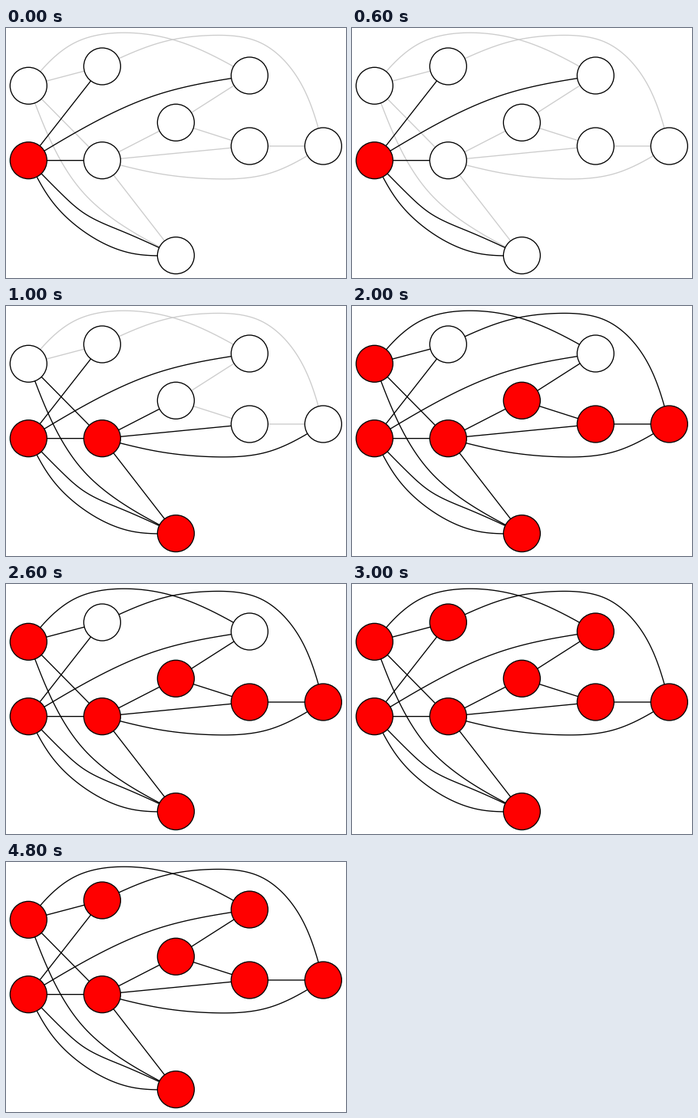
Recreate the animation shown at these times as a matplotlib script. Size 443 by 326 pixels, loop 6000 ms.

```python
import matplotlib.pyplot as plt
import numpy as np
from matplotlib.animation import FuncAnimation
from matplotlib.patches import Circle

WIDTH, HEIGHT, DPI = 443, 326, 64
RADIUS = 24
MARGIN, COLUMN = 29.33, 96
STROKE = 4 / 3 * 72 / DPI
FADED = "#cccccc"

# name: (column, y, step at which the node is reached)
NODES = {
    "a": (0, 75.3, 2), "b": (1, 50, 3), "c": (0, 172.67, 0),
    "d": (1, 172.67, 1), "e": (2, 123.3, 2), "f": (3, 62, 3),
    "g": (3, 154, 2), "h": (4, 154, 2), "i": (2, 296.6, 1),
}

STRAIGHT = "ab ad bc cd de dg di ef eg gh".split()

# Edges that bend through a few waypoints between their nodes
BENT = [
    ("af", (55, 45.5), (90, 19), (150, 6.2), (225, 17.5)),
    ("bh", (205, 18), (270, 9.5), (330, 18.5), (378, 62)),
    ("cf", (101, 130.5), (197, 87)),
    ("ci", (72, 216), (101, 241), (150, 264.5)),
    ("ci", (60, 226), (101, 265), (165, 294)),
    ("ai", (60, 151), (101, 215), (152, 257.5)),
    ("dh", (200, 190), (270, 196.7), (340, 190.5)),
]

plt.rcParams["path.snap"] = False
fig = plt.figure(figsize=(WIDTH / DPI, HEIGHT / DPI), dpi=DPI, facecolor="white")
ax = fig.add_axes([0, 0, 1, 1])
ax.set(xlim=(0, WIDTH), ylim=(HEIGHT, 0))
ax.axis("off")


def center(name):
    column, y, _ = NODES[name]
    return MARGIN + COLUMN * column, y


def smooth(points, samples=120):
    """Natural cubic spline through the points, by chord length."""
    points = np.array(points)
    chords = np.hypot(*np.diff(points, axis=0).T)
    knots = np.append(0, np.cumsum(chords)) / chords.sum()

    def cubic(t):
        return np.abs(t[:, None] - knots) ** 3

    def linear(t):
        return np.stack([np.ones_like(t), t], axis=1)

    system = np.block([[cubic(knots), linear(knots)],
                       [linear(knots).T, np.zeros((2, 2))]])
    weights = np.linalg.solve(system, np.vstack([points, np.zeros((2, 2))]))
    t = np.linspace(0, 1, samples)
    return np.hstack([cubic(t), linear(t)]) @ weights


def add_edge(ends, *waypoints):
    points = [center(ends[0]), *waypoints, center(ends[1])]
    if waypoints:
        points = smooth(points)
    line, = ax.plot(*np.transpose(points), lw=STROKE)
    return line, min(NODES[end][2] for end in ends)


def add_node(name):
    disc = Circle(center(name), RADIUS, ec="black", lw=STROKE, zorder=3)
    return ax.add_patch(disc), NODES[name][2]


edges = [add_edge(ends) for ends in STRAIGHT] + [add_edge(*edge) for edge in BENT]
nodes = [add_node(name) for name in NODES]
ax.set(xlim=(0, WIDTH), ylim=(HEIGHT, 0))


def update(step):
    for line, reached in edges:
        active = reached <= step
        line.set_color("black" if active else FADED)
        line.set_zorder(2 if active else 1)
    for disc, reached in nodes:
        disc.set_facecolor("red" if reached <= step else "white")
    return [artist for artist, _ in edges + nodes]


anim = FuncAnimation(fig, update, frames=6, interval=1000, repeat=True,
                     repeat_delay=0, blit=False)
plt.show()
```
